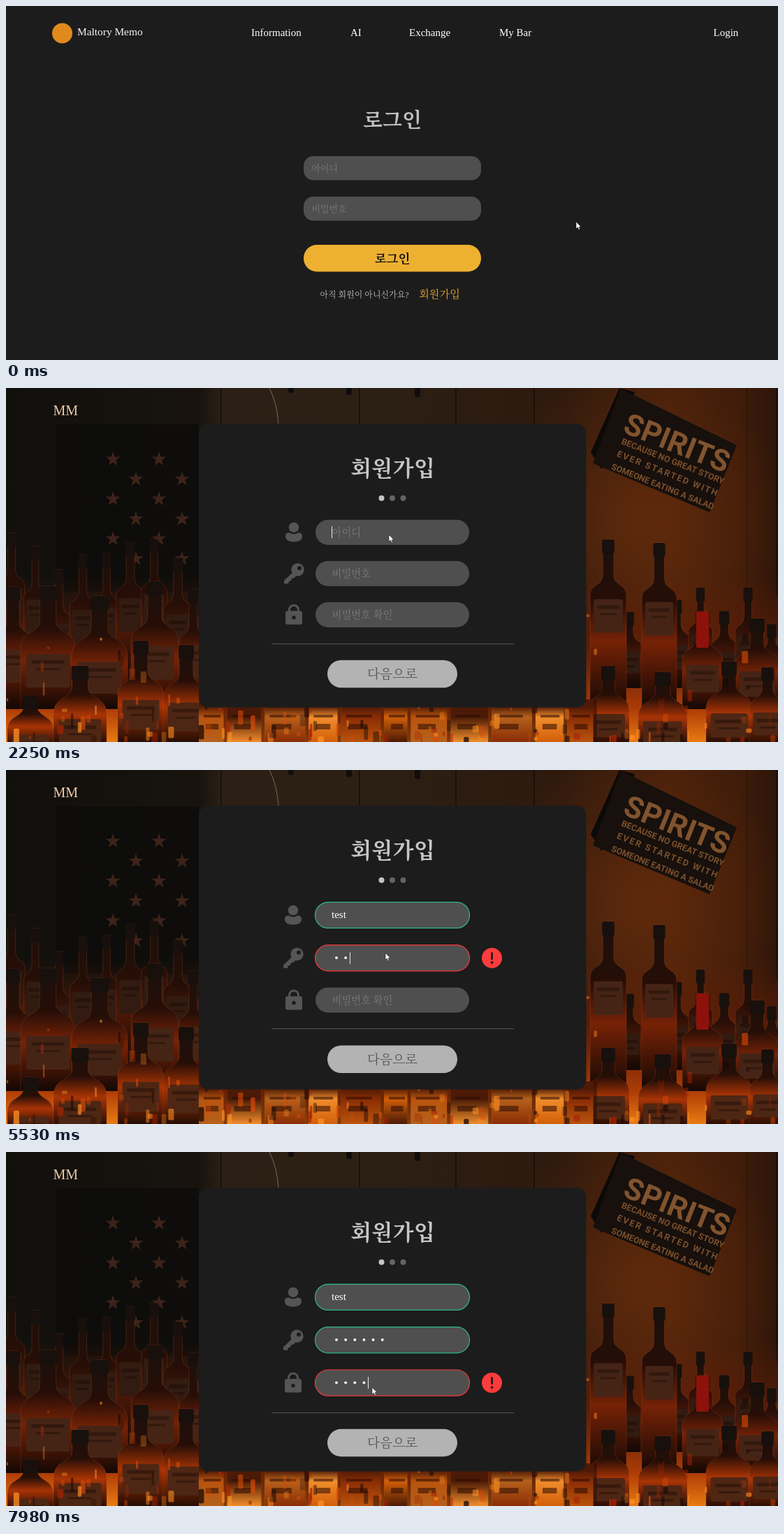
These frames come from a looping animation (1105x507 px, 8 s). An HTML page with a canvas:

```html
<!DOCTYPE html>
<html lang="ko">
<head>
<meta charset="utf-8">
<title>회원가입</title>
<style>
html, body { margin: 0; width: 100%; height: 100%; overflow: hidden; background: #1c1c1c; }
canvas { display: block; width: 1105px; height: 507px; }
</style>
</head>
<body>
<canvas id="stage" width="1105" height="507"></canvas>
<script>
const W = 1105, H = 507, LOOP = 8000, TICK = 70;
const SERIF = '"Liberation Serif", "Noto Serif CJK KR", "Noto Sans CJK KR", "Noto Sans CJK", serif';
const SANS = '"Noto Sans", "Noto Sans CJK KR", "Noto Sans CJK", sans-serif';
const ctx = document.getElementById('stage').getContext('2d');

const clamp = v => Math.min(1, Math.max(0, v));
const within = (t, a, b) => t >= a && t < b;
const fade = (t, a, b, d) => clamp((t - a) / d) * clamp(1 - (t - b) / d);

function box(c, x, y, w, h, r, fill, stroke) {
  c.beginPath();
  c.roundRect(x, y, w, h, r);
  if (fill) { c.fillStyle = fill; c.fill(); }
  if (stroke) { c.strokeStyle = stroke; c.lineWidth = 1.2; c.stroke(); }
}
function disc(c, x, y, r, fill) {
  c.beginPath();
  c.arc(x, y, r, 0, Math.PI * 2);
  c.fillStyle = fill;
  c.fill();
}
function poly(c, pts, fill) {
  c.beginPath();
  pts.forEach(([x, y]) => c.lineTo(x, y));
  c.closePath();
  c.fillStyle = fill;
  c.fill();
}
function label(s, x, y, size, color, { align = 'left', family = SERIF, weight = 400, c = ctx } = {}) {
  c.font = `${weight} ${size}px ${family}`;
  c.textAlign = align;
  c.fillStyle = color;
  c.fillText(s, x, y);
}
// Hangul line centred vertically on cy
const hangul = (s, x, cy, size, color, opt) => label(s, x, cy + size * 0.37, size, color, opt);

/* ---------- bar photo, painted once in flat tones ---------- */
function ramp(c, x0, y0, x1, y1, stops) {
  const g = c.createLinearGradient(x0, y0, x1, y1);
  stops.forEach(([p, col]) => g.addColorStop(p, col));
  return g;
}
function star(c, x, y, r) {
  const pts = [];
  for (let i = 0; i < 10; i++) {
    const a = i * Math.PI / 5 - Math.PI / 2, d = i % 2 ? r * 0.4 : r;
    pts.push([x + d * Math.cos(a), y + d * Math.sin(a)]);
  }
  poly(c, pts, '#3d231a');
}
function bottle(c, x, top, w, base, glow, tag) {
  const h = base - top, n = w * 0.15, s = top + Math.min(h * 0.36, 62), k = w * 0.45;
  c.beginPath();
  c.moveTo(x - n, top);
  c.lineTo(x - n, s - 12);
  c.bezierCurveTo(x - n, s + 6, x - w / 2, s, x - w / 2, s + k * 0.8);
  c.lineTo(x - w / 2, base);
  c.lineTo(x + w / 2, base);
  c.lineTo(x + w / 2, s + k * 0.8);
  c.bezierCurveTo(x + w / 2, s, x + n, s + 6, x + n, s - 12);
  c.lineTo(x + n, top);
  c.closePath();
  c.fillStyle = ramp(c, 0, top, 0, base, [[0, '#1a100c'], [0.35, '#260e07'], [0.6, glow], [1, '#120704']]);
  c.fill();
  c.strokeStyle = 'rgba(215,95,40,.22)';
  c.lineWidth = 1;
  c.stroke();
  box(c, x - n - 1, top, n * 2 + 2, 20, 2, '#17100d');
  box(c, x - w * 0.4, s + k, w * 0.8, Math.min(48, h * 0.28), 3, tag);
  c.fillStyle = 'rgba(20,8,4,.4)';
  c.fillRect(x - w * 0.3, s + k + 9, w * 0.6, 5);
  c.fillRect(x - w * 0.22, s + k + 20, w * 0.44, 3);
}
function paintPhoto() {
  const cv = document.createElement('canvas');
  cv.width = W; cv.height = H;
  const c = cv.getContext('2d');
  let seed = 11;
  const rnd = () => (seed = seed * 16807 % 2147483647) / 2147483647;

  c.fillStyle = ramp(c, 0, 0, W, 0, [[0, '#11100d'], [0.25, '#18130e'], [0.28, '#2c2016'],
    [0.5, '#2c1f14'], [0.72, '#2e190d'], [0.86, '#4a210a'], [0.95, '#3f1c0a'], [1, '#2d150a']]);
  c.fillRect(0, 0, W, H);
  const lamp = c.createRadialGradient(900, 190, 20, 900, 190, 220);
  lamp.addColorStop(0, 'rgba(118,50,12,.5)');
  lamp.addColorStop(1, 'rgba(118,50,12,0)');
  c.fillStyle = lamp;
  c.fillRect(680, 0, 425, 410);
  c.fillStyle = 'rgba(8,4,2,.5)';
  [307, 505, 643, 755].forEach(x => c.fillRect(x, 0, 2, 51));
  c.fillRect(1060, 0, 1, 300);
  c.fillRect(1102, 0, 2, 300);
  c.strokeStyle = '#75685a';
  c.beginPath();
  c.moveTo(377, 0);
  c.quadraticCurveTo(388, 22, 390, 51);
  c.stroke();
  [408, 491, 589].forEach((x, i) => box(c, x - 4, -3, 8, 10 + i * 3, 3, '#100d0c'));

  c.fillStyle = 'rgba(11,11,10,.75)';
  c.fillRect(72, 52, 204, 240);
  for (let row = 0; row < 6; row++)
    for (let col = 0; col < 4; col++)
      if ((row + col) % 2 === 0) star(c, 153 + col * 33, 102 + row * 28.5, 11);

  // wall sign
  poly(c, [[878, 0], [900, 6], [852, 116], [837, 92]], '#0c0908');
  poly(c, [[880, 1], [1046, 82], [1007, 178], [840, 108]], '#17100c');
  c.save();
  c.translate(954, 106);
  c.rotate(0.38);
  const type = { align: 'center', family: 'Roboto, "Liberation Sans", sans-serif', weight: 700, c };
  label('SPIRITS', -4, -13, 43, '#81532e', type);
  label('BECAUSE NO GREAT STORY', 0, 3, 12.3, '#7c4f2c', type);
  c.letterSpacing = '2px';
  label('EVER STARTED WITH', 0, 22, 12.6, '#7c4f2c', type);
  c.letterSpacing = '0px';
  label('SOMEONE EATING A SALAD', 0, 42, 12.3, '#7c4f2c', type);
  c.restore();

  // glowing shelf
  c.fillStyle = ramp(c, 0, 270, 0, H, [[0, 'rgba(110,30,4,0)'], [0.4, 'rgba(105,30,5,.6)'],
    [0.8, '#ad3c06'], [1, '#e97a12']]);
  c.fillRect(0, 270, W, 237);

  // back row, then the larger bottles before it
  for (let x = 8; x < W; x += 34) {
    if (x > 280 && x < 825) continue;
    bottle(c, x, (x < 280 ? 208 : 285) + rnd() * 60, 32 + rnd() * 12, 430, '#4b1808', '#321b11');
  }
  const mid = [[10, 285, 60], [60, 284, 78], [134, 298, 80], [213, 277, 68], [268, 288, 40],
    [862, 217, 52], [935, 222, 50], [997, 320, 58], [1075, 330, 64]];
  mid.forEach(([x, top, w]) => bottle(c, x, top, w, 460, '#762206', '#452416'));
  box(c, 988, 320, 18, 52, 2, '#8d120b');
  const front = [[35, 440, 66], [106, 398, 76], [193, 362, 66], [258, 368, 66],
    [862, 398, 60], [940, 407, 70], [1035, 392, 66], [1090, 400, 52]];
  front.forEach(([x, top, w]) => bottle(c, x, top, w, 515, '#a83405', '#4e2614'));

  // tags below the card
  const tones = ['#b9530d', '#4a1a06', '#b5611c', '#f08d2c', '#8a2d05', '#d25f09'];
  for (let x = 276, i = 0; x < 832; i++) {
    const w = 38 + rnd() * 26;
    box(c, x, 446, w - 5, 70, 4, ramp(c, 0, 456, 0, H, [[0, '#4d1a06'], [0.3, tones[i % 6]], [1, tones[(i + 2) % 6]]]));
    c.fillStyle = 'rgba(45,12,2,.55)';
    c.fillRect(x + 7, 468, w * 0.6, 4);
    c.fillRect(x + 10, 481, w * 0.45, 8);
    c.fillRect(x + w - 5, 446, 5, 61);
    x += w;
  }
  // light caught in the glass
  for (let i = 0; i < 170; i++) {
    const y = 500 - 190 * rnd() * rnd();
    c.globalAlpha = 0.25 + 0.55 * rnd();
    box(c, rnd() * W, y, 2 + rnd() * 7, 4 + rnd() * 18, 2, ['#ff8f22', '#da4a06', '#a82405', '#1a0804'][i % 4]);
  }
  c.globalAlpha = 1;
  return cv;
}
const photo = paintPhoto();

/* ---------- pointer ---------- */
// [start, end, x, y]: travels to x, y between start and end
const moves = [[0, 560, 621, 415], [1560, 2050, 548, 210], [4450, 4870, 543, 262],
  [6070, 6630, 526, 337], [7030, 7380, 524, 337]];
const clicks = [1360, 2180, 4870, 6630];

function pointerAt(t) {
  let x = 816, y = 309;
  for (const [a, b, tx, ty] of moves) {
    const p = clamp(Math.floor((t - a) / TICK) * TICK / (b - a)), e = p * p * (3 - 2 * p);
    x += (tx - x) * e;
    y += (ty - y) * e;
  }
  return [x, y];
}
function drawPointer(t) {
  const [x, y] = pointerAt(t);
  if (within(t, 1500, 2050) && y > 390) {
    disc(ctx, x - 0.5, y, 5, '#d81e1e');
    disc(ctx, x - 0.5, y, 3.3, '#fff');
    ctx.strokeStyle = '#d81e1e';
    ctx.lineWidth = 1.7;
    ctx.beginPath();
    ctx.moveTo(x - 3.2, y - 2.7);
    ctx.lineTo(x + 2.2, y + 2.7);
    ctx.stroke();
    return;
  }
  if (clicks.some((c, i) => within(t, c, c + (i ? TICK : 2 * TICK)))) disc(ctx, x, y, 8.5, 'rgba(205,195,0,.62)');
  ctx.save();
  ctx.translate(x, y);
  poly(ctx, [[0, 0], [0, 10], [2.3, 8], [4, 11.5], [5.6, 10.8], [4.1, 7.4], [7, 7.2]], '#fff');
  ctx.strokeStyle = 'rgba(0,0,0,.75)';
  ctx.lineWidth = 0.7;
  ctx.stroke();
  ctx.restore();
}

function statusBar(t) {
  const a = fade(t, 600, 1850, 100);
  if (!a) return;
  ctx.globalAlpha = a;
  box(ctx, 0, 494, 151, 13, [0, 3, 0, 0], '#1d1c1c');
  label('https://www.maltorymemo.shop/signUp', 1, 503.5, 8.3, '#c0c0c0', { family: '"Open Sans", ' + SANS });
  ctx.globalAlpha = 1;
}

/* ---------- login page ---------- */
function loginPage() {
  ctx.fillStyle = '#1c1c1c';
  ctx.fillRect(0, 0, W, H);
  disc(ctx, 80.5, 39, 14.5, '#e08a1e');
  label('Maltory Memo', 102, 42, 15.4, '#f4f4f4');
  [['Information', 351], ['AI', 493], ['Exchange', 577], ['My Bar', 706], ['Login', 1012.5]]
    .forEach(([s, x]) => label(s, x, 43, 15, '#fff'));
  const mid = { align: 'center' }, strong = { align: 'center', weight: 600 };
  hangul('로그인', 553, 163, 29, '#c0c0c0', strong);
  box(ctx, 426, 215, 254, 34.5, 14, '#4f4f4f');
  hangul('아이디', 437.5, 232, 13, '#7b7b7b');
  box(ctx, 426, 273, 254, 34.5, 14, '#4f4f4f');
  hangul('비밀번호', 437.5, 290, 13, '#7b7b7b');
  box(ctx, 426, 342, 254, 38.5, 19, '#edb031');
  hangul('로그인', 553, 362, 17.5, '#111', strong);
  hangul('아직 회원이 아니신가요?', 513, 413.5, 12, '#c2c2c2', mid);
  hangul('회원가입', 620.5, 412, 15.2, '#eda92f', mid);
}

/* ---------- sign-up page ---------- */
const ICON = '#555';
const icons = [
  () => {
    disc(ctx, 0, -7, 7.2, ICON);
    ctx.beginPath();
    ctx.moveTo(-12, 6);
    ctx.bezierCurveTo(-12, 1, -9, 0.5, -6, 0.5);
    ctx.quadraticCurveTo(0, 4.5, 6, 0.5);
    ctx.bezierCurveTo(9, 0.5, 12, 1, 12, 6);
    ctx.bezierCurveTo(12, 11, 7, 13.5, 0, 13.5);
    ctx.bezierCurveTo(-7, 13.5, -12, 11, -12, 6);
    ctx.fill();
  },
  () => {
    poly(ctx, [[1, -4], [-14, 10], [-14, 14.5], [-8, 14.5], [-7, 11], [-4, 10.5], [-3, 7], [0, 6.5], [5, 2]], ICON);
    disc(ctx, 5.5, -5.5, 9.2, ICON);
    disc(ctx, 8, -7.8, 3, '#1c1c1c');
  },
  () => {
    box(ctx, -12, -5.5, 24, 19.5, 3, ICON);
    ctx.strokeStyle = ICON;
    ctx.lineWidth = 3;
    ctx.beginPath();
    ctx.moveTo(-6.5, -4);
    ctx.lineTo(-6.5, -7);
    ctx.arc(0, -7, 6.5, Math.PI, 0);
    ctx.lineTo(6.5, -4);
    ctx.stroke();
    disc(ctx, 0, 4, 2.7, '#1c1c1c');
  }
];
// keys: times of the typed characters; the row turns green on the last of `full`
const rows = [
  { hint: '아이디', focus: [2180, 4870], keys: [3790, 3990, 4250, 4450], full: 4, text: 'test' },
  { hint: '비밀번호', focus: [4870, 6630], keys: [5190, 5400, 5600, 5800, 5930, 6070], full: 6, tip: [4980, 5230] },
  { hint: '비밀번호 확인', focus: [6630, LOOP], keys: [7030, 7170, 7380, 7910], full: 6, tip: [6720, 7030] }
];

function field(row, i, top, t) {
  const n = row.keys.filter(k => t >= k).length;
  const state = !n ? 0 : n < row.full ? 1 : 2;
  const h = state ? 38.35 : 36, cy = top + h / 2;
  ctx.save();
  ctx.translate(state ? 411 : 412, cy);
  ctx.fillStyle = ICON;
  icons[i]();
  ctx.restore();

  if (state) box(ctx, 442.5, top + 0.6, 221, h - 1.2, 18.5, '#4f4f4f', state === 1 ? '#f93a3a' : '#2fb985');
  else box(ctx, 443, top, 220, h, 18, '#4f4f4f');

  let end = 466;
  if (!n) {
    hangul(row.hint, 466.5, cy, 14.4, '#7b7b7b');
  } else if (row.text) {
    const s = row.text.slice(0, n);
    label(s, 466, cy + 4.5, 15, '#fff');
    end += ctx.measureText(s).width;
  } else {
    for (let k = 0; k < n; k++) disc(ctx, 473 + k * 13.15, cy - 0.3, 1.9, '#fff');
    end += n * 13.15;
  }
  const idle = within(t, 3240, 3790);
  if (within(t, ...row.focus) && !idle) {
    ctx.fillStyle = '#e8e8e8';
    ctx.fillRect(Math.floor(end), Math.round(cy - 8.5), 1, 17);
  }
  if (state === 1) {
    disc(ctx, 695.5, cy, 14.5, '#fc3c3c');
    box(ctx, 694, cy - 8.5, 3, 11, 1.5, '#2a1616');
    disc(ctx, 695.5, cy + 6.5, 1.9, '#2a1616');
  }
  return h;
}
function tooltip(y, a) {
  ctx.save();
  ctx.globalAlpha = a;
  ctx.shadowColor = 'rgba(0,0,0,.45)';
  ctx.shadowBlur = 5;
  box(ctx, 515, y, 242, 33, 5, '#1e1e1f');
  ctx.shadowBlur = 0;
  disc(ctx, 530.5, y + 16, 6, '#4285f4');
  hangul('Tavero 계정에 저장된 비밀번호 및 패스키 사용', 546, y + 16, 10.4, '#dcdcdc', { family: SANS });
  ctx.restore();
}
function signUpPage(t) {
  ctx.drawImage(photo, 0, 0);
  label('MM', 67.5, 39, 20, '#f0cba8');
  box(ctx, 276, 51, 554.5, 406.5, 14, '#1c1c1c');
  hangul('회원가입', 553.5, 114.5, 31.2, '#c6c6c6', { align: 'center', weight: 600 });
  [537.5, 553, 568.5].forEach((x, i) => disc(ctx, x, 157.7, 4, i ? '#646464' : '#c4c4c4'));

  let y = 188.7;
  const tips = [];
  rows.forEach((row, i) => {
    y += field(row, i, y, t);
    if (row.tip) tips.push([y + 6, fade(t, ...row.tip, 100)]);
    y += 23;
  });
  ctx.fillStyle = '#555';
  ctx.fillRect(380, Math.round(y), 347, 1);
  y += 24;
  box(ctx, 460, y, 186, 39.5, 19.7, '#b3b3b3');
  hangul('다음으로', 553, y + 19.5, 18.7, '#565656', { align: 'center', weight: 500 });
  tips.forEach(([ty, a]) => a && tooltip(ty, a));
}

function frame(now) {
  const t = Math.max(0, now) % LOOP;
  if (t < 1500) loginPage();
  else signUpPage(t);
  statusBar(t);
  drawPointer(t);
  requestAnimationFrame(frame);
}
frame(0);
</script>
</body>
</html>
```
